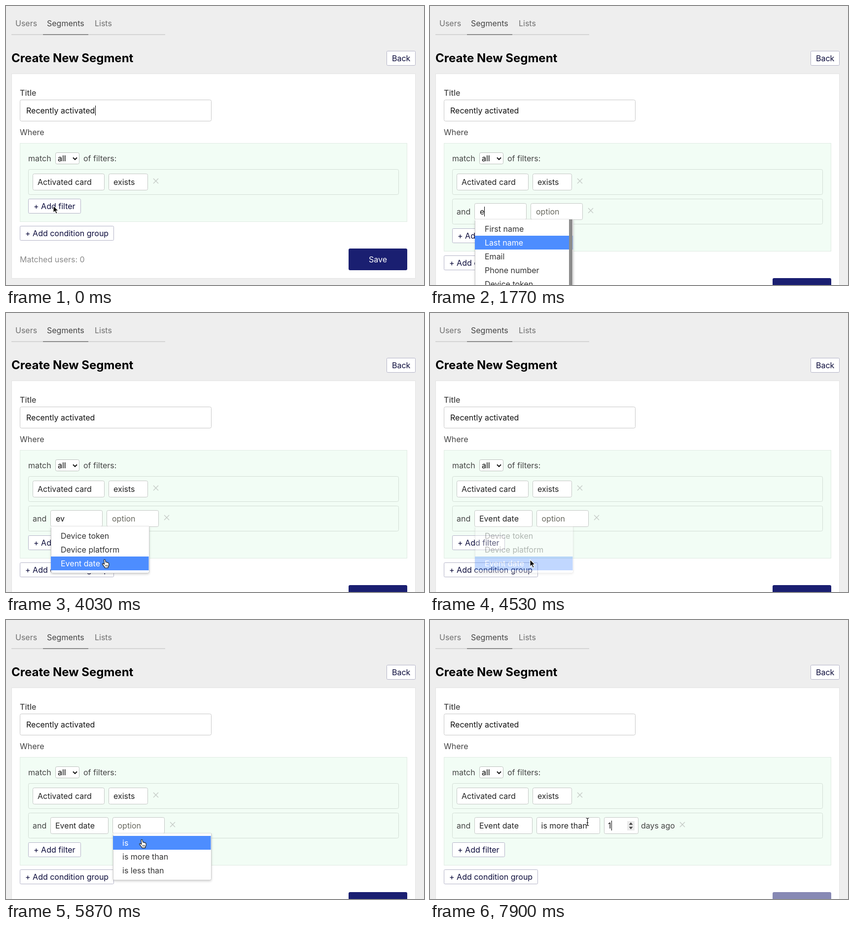
Animation of 848 by 566 pixels, one loop 8000 ms. Source, as an HTML page:

```html
<!DOCTYPE html>
<html lang="en">
<head>
<meta charset="utf-8">
<title>Create New Segment</title>
<style>
  html, body { margin: 0; width: 100%; height: 100%; overflow: hidden; background: #eee; }
  svg { display: block; width: 848px; height: 566px; }
  text {
    font: 400 16px Inter, "Open Sans", sans-serif;
    font-optical-sizing: none;
    fill: #444;
    white-space: pre;
  }
  .menu { filter: drop-shadow(0 2px 2px rgba(0, 0, 0, .18)); }
</style>
</head>
<body>
<svg id="stage" viewBox="0 0 848 566" xmlns="http://www.w3.org/2000/svg"></svg>
<script>
const LOOP = 8000;
const INK = '#0c0c3c', DARK = '#111', HINT = '#68685f', BLUE = '#4d8dff';

// Event times in ms
const ADD = 170, OPEN1 = 840, KEY_E = 1720, KEY_V = 2070, PICK1 = 4400,
      OPEN2 = 5185, PICK2 = 6290, FOCUS = 6730, KEY_1 = 7130, DIM = 7710;

// Markup helpers; boxes are given by their outer edges
const box = (x1, y1, x2, y2, fill, line, r = 0) =>
  `<rect x="${x1 + .5}" y="${y1 + .5}" width="${x2 - x1 - 1}" height="${y2 - y1 - 1}" rx="${r}" fill="${fill}" stroke="${line}"/>`;
const fillBox = (x, y, w, h, fill, extra = '') =>
  `<rect x="${x}" y="${y}" width="${w}" height="${h}" fill="${fill}" ${extra}/>`;
const text = (x, y, str, fill = '#444', extra = '') =>
  `<text x="${x}" y="${y}" style="fill:${fill};${extra}">${str}</text>`;
const group = (id, inner, extra = '') => `<g id="${id}" ${extra}>${inner}</g>`;
const field = (x1, y1, x2) => box(x1, y1, x2, y1 + 34, '#fff', '#c4c8c5', 3);
const button = (x1, y1, x2, str) =>
  box(x1, y1, x2, y1 + 30, '#fff', '#b4b4c8', 2) + text(x1 + 11, y1 + 21, str, INK);
const cross = (x, y) =>
  `<path d="M${x - 5} ${y - 5}l10 10m0 -10l-10 10" stroke="#c3c9c5" stroke-width="1.3" fill="none"/>`;
const filterRow = y => box(45, y, 797, y + 52, 'none', '#d3ded6', 3);

function menu(id, x, height, items) {
  const shape = `M${x + .5} 433v${height - 3.5}q0 3 3 3h193q3 0 3 -3v${3.5 - height}z`;
  return group(id,
    `<path class="menu" d="${shape}" fill="#fff" stroke="#ccc"/>` +
    fillBox(x, 433, 199, 2, '#fff') +
    fillBox(x, 438, 198.5, 28, BLUE, 'class="mark"') +
    items.map((s, i) => text(x + (x > 200 ? 19 : 20), 458 + 28 * i, s, '#333')).join(''));
}

const header =
  fillBox(0, 0, 848, 566, '#eee') +
  text(19, 41, 'Users', '#6f6f6f') + text(83, 41, 'Segments') + text(180, 41, 'Lists', '#6f6f6f') +
  fillBox(11, 57, 312, 2, '#d5d5d5') + fillBox(75, 57, 92, 2, '#8c8c8c') +
  text(11, 114, 'Create New Segment', '#000', 'font-size:24px;font-weight:700') +
  button(772, 91, 831, 'Back');

const panels =
  `<rect id="card" x="11.5" y="137.5" width="819" height="415" fill="#fff" stroke="#e4e4e4"/>` +
  `<rect id="green" x="28.5" y="278.5" width="785" height="159" fill="#f2fdf5" stroke="#e0ebe3"/>`;

const form =
  text(28, 182, 'Title', '#444', 'font-weight:500') +
  box(28, 190, 417, 234, '#fff', '#c8c8c8', 3) + text(41, 218, 'Recently activated', DARK) +
  text(28, 262, 'Where') +
  text(45, 315, 'match') + box(100, 297, 149, 321, '#fff', '#bcc2be', 3) +
  text(105, 315, 'all', '#000') +
  `<path d="M136 307.5l4 4 4 -4" stroke="#111" stroke-width="2" fill="none"/>` +
  text(157, 315, 'of filters:') +
  filterRow(331) + field(54, 340, 200) + text(64, 363, 'Activated card', '#222') +
  field(208, 340, 288) + text(218, 363, 'exists', '#222') + cross(304, 355);

const footer = group('footer',
  button(45, 391, 152, '+ Add filter') +
  button(28, 446, 219, '+ Add condition group') +
  text(28, 520, 'Matched users: 0', '#8a8a8a') +
  group('save', fillBox(695, 492, 119, 44, '#1a1f71', 'rx="3"') +
    text(754.5, 520, 'Save', '#fff', 'text-anchor:middle')));

const row = group('row',
  filterRow(391) + text(54, 423, 'and') +
  group('empty', field(90, 400, 196) + text(101, 423, 'Condition', HINT, '').replace('<text', '<text id="query"') +
    field(204, 400, 310) + text(215, 423, 'option', HINT) + cross(326, 415)) +
  group('named', field(90, 400, 208) + text(100, 423, 'Event date', '#222')) +
  group('unset', field(216, 400, 322) + text(226.5, 423, 'option', HINT) + cross(338, 415)) +
  group('ready', field(216, 400, 345) + text(225.5, 423, 'is more than', '#222') +
    field(353, 400, 423) + text(428, 423, 'days ago') + cross(512, 415)) +
  group('spin', fillBox(400, 408, 15, 19, '#ebebeb') +
    `<path d="M403.5 415.5l4 -5 4 5zM403.5 419.5l4 5 4 -5z" fill="#444"/>`) +
  group('digit', text(361, 423, '1', DARK)));

const menus =
  menu('all', 91, 200, ['First name', 'Last name', 'Email', 'Phone number', 'Device token']).replace(
    /<\/g>$/, fillBox(282, 433, 7, 140, '#8c8c8c') + '</g>') +
  menu('found', 91, 95, ['Device token', 'Device platform', 'Event date']) +
  menu('ops', 217, 95, ['is', 'is more than', 'is less than']);

const pointer = group('pointer',
  group('arrow', `<path d="M0 0v14.2l3.3 -3 2.3 5.3 2.5 -1.1 -2.3 -5.1h4.4z" fill="#000" stroke="#fff" stroke-width="1.1"/>`) +
  group('beam', `<path d="M-3 -7.5q3 0 3 2v11q0 2 -3 2M3 -7.5q-3 0 -3 2M3 7.5q-3 0 -3 -2M-1.8 1.8h3.6" fill="none" stroke="#fff" stroke-width="2.6" opacity=".7"/>
    <path d="M-3 -7.5q3 0 3 2v11q0 2 -3 2M3 -7.5q-3 0 -3 2M3 7.5q-3 0 -3 -2M-1.8 1.8h3.6" fill="none" stroke="#111" stroke-width="1.2"/>`) +
  group('hand', `<path d="M-1.4 .8q1.4 -1.6 2.8 .2l.9 4.6q1.6 -1 2.3 .5 1.6 -.6 2.2 .8 1.8 -.3 1.9 1.5v4l-1.6 3v1.6h-6.6l-.6 -1.6q-1.8 -2.6 -4.2 -5.2 -1 -2.2 1.2 -2.2l2.6 1.8z" fill="#fff" stroke="#111" stroke-width="1.1" stroke-linejoin="round"/>
    <path d="M2 11.2v3M4 11.2v3M6 11.2v3" stroke="#111" stroke-width=".9"/>`));

const stage = document.getElementById('stage');
stage.innerHTML = header + panels + form + footer + row + menus +
  fillBox(0, 0, 1, 20, '#000', 'id="caret"') + pointer;

const el = {};
stage.querySelectorAll('[id]').forEach(n => el[n.id] = n);
const show = (id, on) => el[id].style.display = on ? '' : 'none';

// Pointer hot spot: time, x, y
const path = [
  [0, 96, 405], [100, 96, 405], [480, 106, 412], [800, 119, 409], [980, 119, 409],
  [1440, 218, 478], [3000, 218, 478], [3160, 216, 481], [3570, 216, 481],
  [3960, 200, 500], [4100, 200, 500], [4370, 201, 503], [4460, 201, 503],
  [5100, 260, 424], [5600, 260, 424], [6200, 296, 474], [6430, 296, 474],
  [6720, 380, 416], [7690, 380, 416], [7900, 319.5, 409.5], [8000, 319.5, 409.5]
];
// Pointer look from each time on
const looks = [[0, 'arrow'], [ADD, 'beam'], [1150, 'hand'], [KEY_E, ''], [3000, 'hand'],
  [PICK1, 'arrow'], [4930, 'beam'], [5790, 'hand'], [PICK2, 'arrow'], [6600, 'beam'],
  [KEY_1, ''], [7700, 'beam']];
// Caret: on, off, x, y
const carets = [
  [0, 130, 181, 202], [OPEN1, 1350, 101, 407], [KEY_E, KEY_V, 110, 407], [KEY_V, 2570, 118, 407],
  [3070, 3570, 118, 407], [4070, PICK1, 118, 407], [OPEN2, 5690, 227, 407], [6190, PICK2, 227, 407],
  [FOCUS, KEY_1, 361, 407], [KEY_1, 7270, 368, 407], [7770, LOOP, 368, 407]
];

function place(t) {
  let i = 0;
  while (i < path.length - 2 && path[i + 1][0] <= t) i++;
  const [a, x, y] = path[i], [b, x2, y2] = path[i + 1];
  const u = Math.min(1, (t - a) / (b - a)), s = u * u * (3 - 2 * u);
  return [x + (x2 - x) * s, y + (y2 - y) * s];
}

const ramp = (t, start, len) => Math.max(0, Math.min(1, (t - start) / len));
const fade = (t, open, close) => ramp(t, open, 150) * (1 - ramp(t, close, 200));

function drawMenu(id, alpha, y, fallback) {
  show(id, alpha > 0);
  el[id].style.opacity = alpha;
  const hit = y >= 438 ? Math.min(2, Math.floor((y - 438) / 28)) : fallback;
  const mark = el[id].querySelector('.mark');
  mark.style.display = hit < 0 ? 'none' : '';
  mark.setAttribute('y', 438 + 28 * Math.max(0, hit));
  el[id].querySelectorAll('text').forEach((n, i) => n.style.fill = i === hit ? '#fff' : '#333');
}

function draw(t) {
  const added = t >= ADD, shift = added ? 60 : 0;
  el.card.setAttribute('height', 415 + shift);
  el.green.setAttribute('height', 159 + shift);
  el.footer.setAttribute('transform', `translate(0 ${shift})`);
  el.save.style.opacity = 1 - .48 * ramp(t, DIM, 150);

  show('row', added);
  show('empty', t < PICK1);
  show('named', t >= PICK1);
  show('unset', t >= PICK1 && t < PICK2);
  show('ready', t >= PICK2);
  show('spin', t >= 6620);
  show('digit', t >= KEY_1);
  el.query.textContent = t < KEY_E ? 'Condition' : t < KEY_V ? 'e' : 'ev';
  el.query.style.fill = t < KEY_E ? HINT : DARK;

  const first = fade(t, OPEN1, PICK1);
  drawMenu('all', t < KEY_V ? first : 0, place(t)[1], -1);
  drawMenu('found', t < KEY_V ? 0 : first, place(Math.min(t, PICK1))[1], -1);
  drawMenu('ops', fade(t, OPEN2, PICK2), place(Math.min(t, PICK2))[1], 0);

  const c = carets.find(([on, off]) => t >= on && t < off);
  show('caret', c);
  if (c) {
    el.caret.setAttribute('x', c[2]);
    el.caret.setAttribute('y', c[3]);
  }

  const [x, y] = place(t);
  const look = looks.filter(l => l[0] <= t).pop()[1];
  ['arrow', 'beam', 'hand'].forEach(k => show(k, k === look));
  el.pointer.setAttribute('transform', `translate(${x.toFixed(1)} ${y.toFixed(1)})`);
}

const start = performance.now();
function tick() {
  draw((performance.now() - start) % LOOP);
  requestAnimationFrame(tick);
}
draw(0);
requestAnimationFrame(tick);
</script>
</body>
</html>
```
